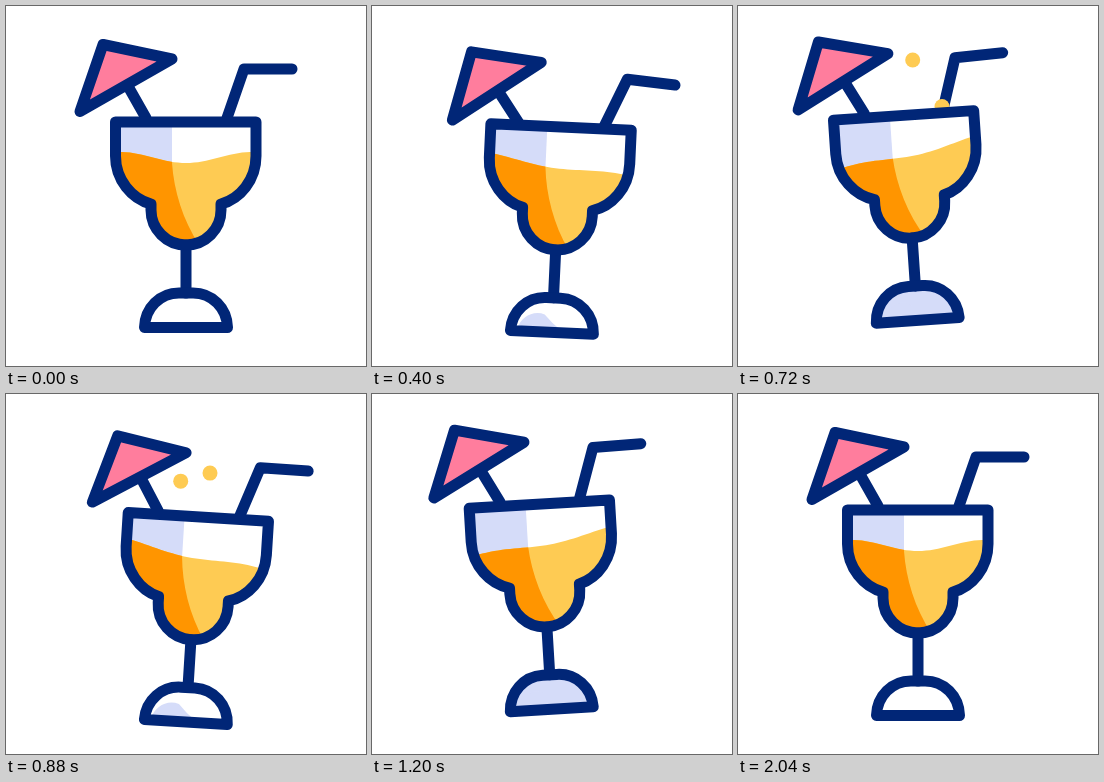
An HTML page that plays this animation: 360 px wide and 360 px high, repeating every 2.72 s.

```html
<!DOCTYPE html>
<html lang="en">
<head>
<meta charset="utf-8">
<title>Cocktail</title>
<style>
  html, body { margin: 0; width: 100%; height: 100%; overflow: hidden; background: #fff; }
  svg { display: block; width: 100vw; height: 100vh; }
  .line { fill: none; stroke: #012677; stroke-width: 11; stroke-linecap: round; stroke-linejoin: round; }
</style>
</head>
<body>
<svg viewBox="0 0 360 360">
  <defs>
    <path id="bowl" d="M109.5 116H250V150C250 174 234 193 215 198V204a35 35 0 0 1-70 0V198C126 193 109.5 174 109.5 150Z"/>
    <path id="foot" d="M138.5 321.5H221.5C221 302 206 287 187 287H173C154 287 139 302 138.5 321.5Z"/>
    <clipPath id="inBowl"><use href="#bowl"/></clipPath>
    <clipPath id="inLiquid"><path id="level"/></clipPath>
  </defs>
  <g class="tilt">
    <path id="straw" class="line" d="M221 112L238 63H286"/>
    <g id="umbrella">
      <path class="line" d="M140 112L123 82"/>
      <path class="line" style="fill:#ff7d9d" d="M97 38.5L166 53L74 105.5Z"/>
    </g>
    <g clip-path="url(#inBowl)">
      <path fill="#fff" d="M100 110H260V245H100Z"/>
      <path fill="#d5dcf9" d="M100 110H166V200H100Z"/>
      <g clip-path="url(#inLiquid)">
        <path fill="#fecb53" d="M100 110H260V245H100Z"/>
        <path fill="#ff9500" d="M100 110H166V157C168 185 177 215 194 240H100Z"/>
      </g>
    </g>
  </g>
  <g fill="#fecb53">
    <circle class="drop" cx="174.7" r="7.5"/>
    <circle class="drop" cx="204" r="7.5"/>
  </g>
  <g class="tilt">
    <use id="footFill" href="#foot"/>
    <path id="shade" fill="#d5dcf9" d="M145 320C148 308 160 300 172 304Q180 313 190 320Z"/>
    <path class="line" d="M180 239V287"/>
    <use class="line" href="#bowl"/>
    <use class="line" href="#foot"/>
  </g>
</svg>
<script>
  const LOOP = 2720;
  const $ = id => document.getElementById(id);
  const all = name => [...document.querySelectorAll(name)];
  const tilts = all('.tilt'), drops = all('.drop');

  // [time, value] pairs joined by sine easing
  const glassKeys = [[0, 0], [280, 7.1], [600, -7.4], [920, 4], [1240, -3.7], [1560, 0]];
  const strawKeys = [[0, 0], [320, 6.2], [600, -3.5], [920, 0.5], [1200, -1], [1500, -1.2], [1680, 0]];
  const umbrellaKeys = [[0, 0], [320, -8], [600, 3], [920, -1.8], [1240, 1.5], [1520, 0]];
  const stirKeys = [[0, 0], [280, 1], [1440, 1], [2000, 0]];
  const swellKeys = [[1400, 0], [1540, 0.035], [1840, 0]];
  const flights = [{ peak: 716, top: 54 }, { peak: 870, top: 79 }];

  function ease(keys, t) {
    if (t <= keys[0][0]) return keys[0][1];
    const i = keys.findIndex(k => k[0] > t);
    if (i < 0) return keys[keys.length - 1][1];
    const [t0, a] = keys[i - 1], [t1, b] = keys[i];
    return a + (b - a) * (1 - Math.cos(Math.PI * (t - t0) / (t1 - t0))) / 2;
  }

  function turn(el, angle, x, y) {
    el.setAttribute('transform', `rotate(${angle} ${x} ${y})`);
  }

  function liquid(angle, stir, swell) {
    const mid = 151.5 + 4 * stir, wave = 5.5 - 3.3 * stir;
    const slope = 0.044 * angle + swell;
    let d = 'M100 245';
    for (let x = 100; x <= 260; x += 4) {
      const u = 2 * Math.PI * (x - 114) / 132;
      const y = mid + slope * (x - 180) - wave * Math.cos(u) + 0.42 * angle * Math.sin(u);
      d += `L${x} ${y.toFixed(2)}`;
    }
    return d + 'L260 245Z';
  }

  function draw(t) {
    const angle = ease(glassKeys, t);
    tilts.forEach(el => turn(el, angle, 75, 322));
    turn($('straw'), ease(strawKeys, t), 212, 140);
    turn($('umbrella'), ease(umbrellaKeys, t), 155, 140);
    $('level').setAttribute('d', liquid(angle, ease(stirKeys, t), ease(swellKeys, t)));

    drops.forEach((el, i) => {
      const { peak, top } = flights[i], p = (t - peak) / 300;
      el.setAttribute('cy', top + (165 - top) * p * p);
      el.style.visibility = Math.abs(p) < 1 ? 'visible' : 'hidden';
    });

    const moving = t >= 40 && t < 1760;
    $('footFill').setAttribute('fill', moving && angle < 1 ? '#d5dcf9' : '#fff');
    $('shade').style.visibility = moving ? 'visible' : 'hidden';
  }

  function frame() {
    const t = performance.now() % LOOP;
    draw(Math.floor(t / 40) * 40);
    requestAnimationFrame(frame);
  }
  frame();
</script>
</body>
</html>
```
